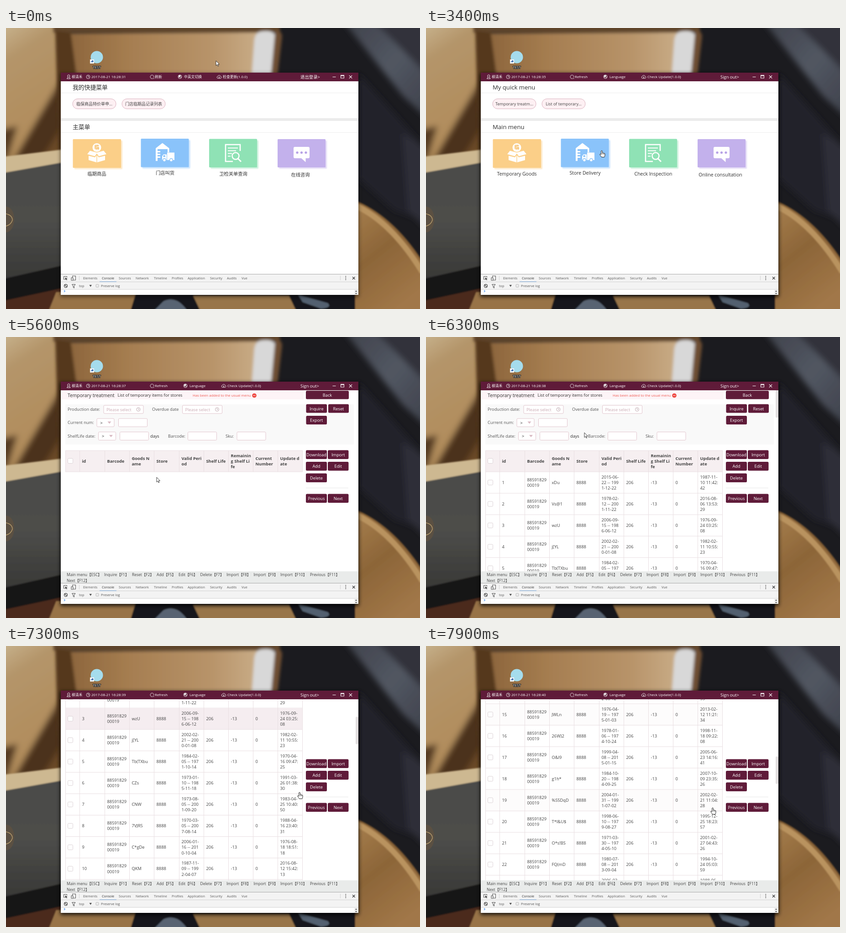
An HTML page for the animation above (8000 ms loop, 907 px wide and 617 px high).

```html
<!DOCTYPE html>
<html lang="zh">
<head>
<meta charset="utf-8">
<style>
html, body { margin: 0; width: 100%; height: 100%; overflow: hidden; background: #1b1a1c; }
svg { position: absolute; left: 0; top: 0; width: 907px; height: 617px; }
#desk { will-change: transform; }
text { font-family: "Open Sans", "Noto Sans CJK SC", "Noto Sans CJK", sans-serif; white-space: pre; }
</style>
</head>
<body>
<svg id="desk" viewBox="0 0 907 617">
  <defs>
    <filter id="soft" x="-20%" y="-20%" width="140%" height="140%"><feGaussianBlur stdDeviation="7"/></filter>
    <filter id="mild" x="-20%" y="-20%" width="140%" height="140%"><feGaussianBlur stdDeviation="3"/></filter>
    <filter id="edge" x="-20%" y="-20%" width="140%" height="140%"><feGaussianBlur stdDeviation="1.4"/></filter>
    <linearGradient id="rail"><stop stop-color="#8d663d"/><stop offset=".3" stop-color="#a57d50"/><stop offset=".75" stop-color="#b8946a"/><stop offset="1" stop-color="#c9ad88"/></linearGradient>
    <linearGradient id="wall" x2=".3" y2="1"><stop stop-color="#cdbb97"/><stop offset=".3" stop-color="#b4956a"/><stop offset="1" stop-color="#b08a58"/></linearGradient>
    <linearGradient id="curtain" x2="1" y2="1"><stop stop-color="#3d4049"/><stop offset=".5" stop-color="#525762"/><stop offset="1" stop-color="#3b3e48"/></linearGradient>
    <linearGradient id="wood" x2=".5" y2="1"><stop stop-color="#a9814f"/><stop offset=".5" stop-color="#8c6538"/><stop offset="1" stop-color="#a17748"/></linearGradient>
    <linearGradient id="lid" x2="0" y2="1"><stop stop-color="#4a4a48"/><stop offset=".5" stop-color="#4d4d4a"/><stop offset="1" stop-color="#383836"/></linearGradient>
  </defs>
  <rect width="907" height="617" fill="#1b1b1f"/>
  <g filter="url(#soft)">
    <path d="M-20-20H125V300H-20Z" fill="url(#wall)"/>
    <path d="M125 105V300H10Z" fill="#4b301a"/>
    <path d="M125 215V300H70Z" fill="#6b4826"/>
    <path d="M-20 225L25 215 0 300H-20Z" fill="#553a21"/>
    <path d="M735-20H930V205L870 150Z" fill="url(#curtain)"/>
    <path d="M800-20L930 110V-20Z" fill="#30323a"/>
    <path d="M772 100L907 250V420L850 400 772 330Z" fill="#22232a"/>
    <path d="M868 230L930 270V450L880 400Z" fill="#2d2f37"/>
  </g>
  <g filter="url(#mild)">
    <path d="M104-10H600V10H104Z" fill="#5f4429"/>
    <path d="M142 12L556 10V130H142Z" fill="url(#rail)"/>
    <path d="M108 6L142 10 158 130 150 270H116Z" fill="#55381d"/>
    <path d="M556 8Q594 2 592 26L581 110H538L544 26Q546 12 556 8Z" fill="#d8d8d8"/>
    <path d="M590 4Q608 6 604 26L594 110H580Z" fill="#6d4d30"/>
  </g>
  <g filter="url(#edge)">
    <path d="M-10 283L130 266V330H-10Z" fill="#cdb891"/>
    <path d="M-10 319L130 294V520L-10 552Z" fill="url(#lid)"/>
    <path d="M-10 552L130 520V630H-10Z" fill="#191412"/>
    <path d="M-10 600L130 570V630H-10Z" fill="#4c291f"/>
    <path d="M760 378Q850 412 920 526V630H760Z" fill="url(#wood)"/>
    <path d="M760 388Q842 422 912 536" fill="none" stroke="#b9935f" stroke-width="12"/>
    <path d="M760 378Q850 412 920 526" fill="none" stroke="#77552f" stroke-width="3"/>
    <path d="M110 580H300L270 630H90Z" fill="#987346"/>
    <path d="M285 580H765V630H270Z" fill="#19191c"/>
    <path d="M345 600Q375 585 400 625H320Z" fill="#596472"/>
    <path d="M410 588H620L640 630H430Z" fill="#987549"/>
    <path d="M640 586L705 604Q715 614 690 616L650 602Z" fill="#536070"/>
  </g>
  <path d="M0 392Q17 394 18 420 17 446 0 449Z" fill="#5b5042"/>
  <path d="M0 408Q14 411 14 422 11 432 0 435" fill="none" stroke="#b49a6b" stroke-width="1.5"/>
</svg>
<svg id="stage" viewBox="0 0 907 617"></svg>
<script>
const WINE = '#5f1b39', INK = '#2e2e2e', LOOP = 8000;
const esc = s => String(s).replace(/&/g, '&amp;').replace(/</g, '&lt;').replace(/>/g, '&gt;');
// y is the optical middle of the line
const text = (x, y, s, size, fill = INK, extra = '') =>
  `<text x="${x}" y="${(y + size * .36).toFixed(2)}" font-size="${size}" fill="${fill}" ${extra}>${esc(s)}</text>`;
const mid = (x, y, s, size, fill, extra = '') => text(x, y, s, size, fill, 'text-anchor="middle" ' + extra);
const rect = (x, y, w, h, fill, extra = '') => `<rect x="${x}" y="${y}" width="${w}" height="${h}" fill="${fill}" ${extra}/>`;
const circle = (x, y, r, fill, extra = '') => `<circle cx="${x}" cy="${y}" r="${r}" fill="${fill}" ${extra}/>`;
const path = (d, fill, extra = '') => `<path d="${d}" fill="${fill}" ${extra}/>`;
const line = (d, stroke, width = 1) => path(d, 'none', `stroke="${stroke}" stroke-width="${width}"`);
const group = (id, body, extra = '') => `<g id="${id}" ${extra}>${body}</g>`;
const button = (x, y, w, h, label) => rect(x, y, w, h, WINE, 'rx="2.5"') + mid(x + w / 2, y + h / 2 + .3, label, 9.25, '#fff');
const card = (x, y, w, h, color) =>
  rect(x + 3, y + 3, w, h, color, 'rx="2" opacity=".45" filter="url(#glow)"') + rect(x, y, w, h, color, 'rx="1.5"');

function desktopIcon() {
  return circle(199, 64, 13.5, '#a5dcec')
    + rect(184, 69, 9, 9, '#f4f6f8') + path('M186 76Q186 72 189 72V70L192 73 189 76V74Q187 74 186 76Z', '#2a5fa8')
    + mid(199, 86.5, 'TEST', 7.6, '#fff', 'stroke="#222" stroke-width="2" stroke-linejoin="round" paint-order="stroke"');
}

function titleIcons(globeX, cloudX) {
  return circle(globeX, 107, 4, 'none', 'stroke="#eee" stroke-width=".9"')
    + path(`M${globeX - 3} 105l3-2 2 2-2 3-2 1zM${globeX + 1} 108l2-1-1 3z`, '#eee')
    + line(`M${cloudX - 3} 110.5a2.3 2.3 0 0 1 0-4.5a3.2 3.2 0 0 1 6 0a2.3 2.3 0 0 1 0 4.5zM${cloudX} 111v-4m-1.5 1.5l1.5-1.5l1.5 1.5`, '#eee', .9);
}

function titleBar() {
  const words = (refresh, lang, langX, update, updateX, out) =>
    titleIcons(langX - 9, updateX - 8) + text(326, 107.5, refresh, 7.9, '#fff') + text(langX, 107.5, lang, 7.8, '#fff')
    + text(updateX, 107.5, update, 7.9, '#fff') + text(645, 107.5, out, 9.4, '#fff');
  return rect(120, 98, 652, 19, WINE)
    + circle(137.3, 105.5, 2.6, 'none', 'stroke="#eee"') + line('M135.5 108L133.5 111.3H141L139 108', '#eee')
    + text(144, 107.5, '柳清禾', 7.8, '#fff')
    + circle(180, 107.3, 4, 'none', 'stroke="#eee" stroke-width=".9"') + line('M180 104.5V107.5H182.5', '#eee', .9)
    + '<text id="clock" x="187" y="110.4" font-size="8" fill="#fff"></text>'
    + line('M321.5 111A4 4 0 1 1 324 107.5L322.5 109M322 110.8H324.5', '#eee', .9)
    + group('barZh', words('刷新', '中英文切换', 390, '检查更新(1.0.0)', 475, '退出登录>'))
    + group('barEn', words('Refresh', 'Language', 402, 'Check Update(1.0.0)', 485, 'Sign out>'))
    + line('M715.5 107.5H722.5M751.8 104.2L758.2 110.6M758.2 104.2L751.8 110.6', '#fff', 1.1)
    + rect(733.5, 104, 7, 6, 'none', 'stroke="#fff"') + rect(733, 103.5, 8, 2, '#fff');
}

function devTools() {
  const tabs = { Elements: 169, Console: 210, Sources: 247, Network: 284, Timeline: 324, Profiles: 363, Application: 398, Security: 447, Audits: 484, Vue: 516 };
  return rect(120, 540, 652, 46, '#f3f3f3') + rect(120, 574, 652, 12, '#fff')
    + line('M120 540.5H772', '#a9a9a9') + line('M120 557.5H772M120 574H772M160.5 544V554M732.5 544V554', '#d3d3d3')
    + line('M129 552H126.5V545.5H133.5V548', '#555') + path('M129.5 547.5L135 551 132.5 551.5 134 554 133 554 131.5 552 130 553.5Z', '#444')
    + rect(145.5, 544.5, 7, 9, 'none', 'stroke="#555"') + rect(143, 548.5, 4, 5.5, '#f3f3f3', 'stroke="#555"')
    + Object.entries(tabs).map(([name, x]) => text(x, 549.3, name, 7.25, name === 'Console' ? '#333' : '#5a5a5a')).join('')
    + line('M205 557H242', '#74a3d8', 1.2)
    + [545.5, 549, 552.5].map(y => circle(744.3, y, .9, '#444')).join('')
    + line('M759 546.3L764.6 552M764.6 546.3L759 552', '#333', 1.2)
    + circle(131, 566.3, 3.5, 'none', 'stroke="#444" stroke-width="1.2"') + line('M128.5 564L133.5 568.8', '#444', 1.2)
    + path('M144.5 563H152L149.3 566.5V571L147.2 569.5V566.5Z', 'none', 'stroke="#444"')
    + text(160, 566.5, 'top', 7.25, '#555') + path('M182.5 564H188L185.25 568.5Z', '#555')
    + rect(197, 563, 6, 6, '#eee', 'rx="1" stroke="#aaa" stroke-width=".8"') + text(208, 566.5, 'Preserve log', 7.25, '#555')
    + line('M127 575.8L129.3 577.8 127 579.8', '#3f8be8', 1.1)
    + rect(763, 575, 8, 11, '#eee') + path('M765 579H769L767 576.5ZM765 582H769L767 584.5Z', '#444');
}

function homePage() {
  const words = (title, pills, menu, labels, size) => text(146, 130.3, title, size) + text(146, 217.3, menu, size)
    + pills.map((s, i) => mid(193.5 + i * 108, 167, s, 9, '#444')).join('')
    + labels.map((s, i) => mid([199, 348.5, 498, 645][i], [320, 318, 320, 322][i], s, size * .8)).join('');
  const pill = x => rect(x, 155.5, 95, 22, '#fdf0f3', 'rx="11" stroke="#dcb3c0"');
  return line('M120 142.5H772M120 229.5H772', '#eee') + rect(120, 198, 652, 6, '#ebebeb') + pill(146) + pill(254)
    + card(146.5, 244, 105.5, 63, '#fbcf88') + card(295.5, 243, 105, 62.5, '#8ac3fa')
    + card(445, 243.5, 105, 62.5, '#8fe2b5') + card(595, 244, 105, 62, '#c3b1ec')
    + circle(199, 262.5, 9.5, '#fff') + mid(199, 262.5, '临', 11, '#f5b95c', 'font-weight="700"')
    + path('M178 277L184 269.5 199 273.5 214 269.5 220 277 203.5 281.5 199 275.5 194.5 281.5ZM181 280.5L195 284 198.3 279.5V295L181 290ZM217 280.5L203 284 199.7 279.5V295L217 290Z', '#fff')
    + path('M328 264L342.7 252.5 357.5 264V273H354V266H332V270H338V273H332V276H338V279H332V282H338V285H332V292H328Z', '#fff')
    + path('M353 273.5H369V290H353ZM342 281.5L345 277.5H352V290H342Z', '#fff') + rect(344.5, 279.5, 4.5, 3.5, '#8ac3fa')
    + [347, 362].map(x => circle(x, 290, 3.4, '#fff', 'stroke="#8ac3fa" stroke-width="1.5"')).join('')
    + line('M513 270V256H481V293H497', '#fff', 2.6) + line('M486 263.5H508M486 269.5H504M486 275.5H495M486 281.5H492', '#fff', 2)
    + circle(503, 281, 7.5, 'none', 'stroke="#fff" stroke-width="2.5"') + line('M508 286.5L515 293.5', '#fff', 3)
    + path('M633 261H662Q665 261 665 264V283Q665 286 662 286H656.5V294.5L647 286H633Q630 286 630 283V264Q630 261 633 261Z', '#fff')
    + [638, 647.5, 657].map(x => circle(x, 273.5, 2.6, '#b7a2e6')).join('')
    + group('homeZh', words('我的快捷菜单', ['临保商品特价单申...', '门店临期品记录列表'], '主菜单', ['临期商品', '门店叫货', '卫检关单查询', '在线咨询'], 12.8))
    + group('homeEn', words('My quick menu', ['Temporary treatm...', 'List of temporary...'], 'Main menu',
      ['Temporary Goods', 'Store Delivery', 'Check Inspection', 'Online consultation'], 13.1));
}

function choicePage() {
  const choice = (x, iconX, color, mark, label, labelX, arrowX) => card(x, 259.5, 158, 87, color)
    + `<g transform="translate(${iconX} 0)">`
    + line('M55 291V282Q55 276 49 275.5H8Q0 276 0 283V323Q0 330 8 330.5H24M14 274.5H40', '#fff', 2.7)
    + line('M7 290H40M7 302H27M7 314H24', '#fff', 2.6)
    + circle(46, 315, 16, color, 'stroke="#fff" stroke-width="2.7"') + mid(46, 315, mark, 17, '#fff', 'font-weight="700"') + '</g>'
    + text(labelX, 365.5, label, 12.5, '#222')
    + circle(arrowX, 366, 5.7, '#fff', 'stroke="#9fb5ae"') + path(`M${arrowX - 2.5} 363L${arrowX + 4} 366 ${arrowX - 2.5} 369 ${arrowX - 1} 366Z`, '#6d9688');
  return button(670, 126, 92.5, 24, 'Go to mainmenu')
    + choice(250, 300, '#b7e7fd', '临', 'List of temporary items', 257, 400.8)
    + choice(479, 527, '#f5e28b', '特', 'Special application list', 488, 627);
}

const COLS = [130, 161, 216, 270, 324, 379, 433, 487, 541, 595, 649];
const ROW = 47.06, TOP = 296;
const HEADS = ['id', 'Barcode', 'Goods N|ame', 'Store', 'Valid Peri|od', 'Shelf Life', 'Remainin|g Shelf Li|fe', 'Current|Number', 'Update d|ate'];
const GOODS = `xDu~2015-06-22 -- 1991-12-22~1987-11-10 11:42:42
Vs@1~1978-02-12 -- 2001-11-22~2016-08-06 13:53:29
wzU~2006-09-15 -- 1986-06-12~1976-09-24 03:25:08
j[YL~2002-02-21 -- 2000-01-08~1982-02-11 10:55:23
Tb(TXbu~1984-02-05 -- 1971-10-14~1970-04-16 09:47:25
CZs~1973-01-10 -- 1985-11-18~1991-03-26 01:38:30
CNW~1973-08-05 -- 2001-09-20~1983-04-25 10:40:50
7VJR5~1970-03-05 -- 2007-08-14~1988-04-16 23:40:31
C*gDe~2006-01-16 -- 2010-10-04~1976-08-18 18:51:18
QKM~1987-11-09 -- 1992-04-07~2016-08-12 15:42:13
p3Kd~1992-05-14 -- 1979-02-19~2004-07-03 08:16:44
Rw!x~1981-10-27 -- 2012-06-30~1997-01-15 21:05:37
hT6~2009-03-02 -- 1988-12-11~1979-05-28 14:32:09
Yq)Z~1995-07-23 -- 1982-06-12~2011-09-06 05:27:55
JWLn~1976-04-19 -- 1975-01-03~2013-02-12 11:21:34
26W)2~1978-01-06 -- 1974-10-24~1998-11-18 09:22:08
O&I9~1999-04-08 -- 2015-01-15~2005-06-23 14:16:41
g1h*~1984-10-20 -- 1984-09-25~2007-10-09 23:35:26
%S5DqD~2004-01-31 -- 1991-07-02~2002-02-21 11:04:28
T*I&U$~1998-06-10 -- 1979-08-27~1995-12-25 18:23:57
O*s!BS~1971-03-30 -- 1974-05-10~2001-02-27 04:43:26
FQ(mD~1980-07-08 -- 2013-09-04~1994-10-24 05:03:59
mL4~2006-03-17 -- 1990-08-21~1988-06-14 16:50:12`.split('\n').map(row => row.split('~'));

const cell = (col, y, lines, fill = '#444', extra = '') =>
  lines.map((s, i) => text(COLS[col] + 5.5, y + (i - (lines.length - 1) / 2) * 12.2, s, 9.3, fill, extra)).join('');
const checkbox = y => rect(135.5, y - 5.5, 11, 11, '#fff', 'rx="2" stroke="#dcd3d6"');
const wrapDate = s => [s.slice(0, 8), s.slice(8, 17), s.slice(17)];

function goodsRow([name, valid, update], i) {
  const y = TOP + ROW * (i + .5);
  const cells = [[i + 1], ['88591829', '00019'], [name], ['8888'], wrapDate(valid), ['206'], ['-13'], ['0'], wrapDate(update)];
  return rect(130, TOP + ROW * i, 519.5, ROW, '#f5edf0', `id="row${i + 1}" opacity="0"`) + checkbox(y)
    + cells.map((lines, c) => cell(c + 1, y, lines)).join('')
    + line(`M130 ${TOP + ROW * (i + 1)}H649.5`, '#e9dfe2');
}

function filterForm() {
  const box = (x, y, w) => rect(x + .5, y + .5, w, 18, '#fff', 'rx="2" stroke="#e2c6ce"');
  const date = x => box(x, 149.5, 87) + text(x + 6.5, 159.3, 'Please select', 9.2, '#c9a9b2')
    + circle(x + 76.5, 159, 4, 'none', 'stroke="#b9a2a9" stroke-width=".9"') + line(`M${x + 76.5} 156.5V159.3H${x + 78.5}`, '#b9a2a9', .9);
  const select = (x, y) => box(x, y, 38) + text(x + 8, y + 10, '>', 9) + path(`M${x + 24} ${y + 7}h8l-4 5z`, '#d9bac3');
  return rect(120, 117, 532, 20, '#fdf4f7') + text(135, 128, 'Temporary treatment', 10.3)
    + text(244.5, 128, 'List of temporary items for stores', 9.15)
    + text(409, 128.5, 'Has been added to the usual menu', 7.8, '#ee5a52') + circle(544, 128.5, 4.8, '#ee4b45') + line('M541.5 128.5H546.5', '#fff', 1.2)
    + rect(130, 148, 632, 88, '#f9f9f9')
    + text(135, 159, 'Production date:', 9.2, '#555') + date(213.5) + text(320, 159, 'Overdue date', 9.2, '#555') + date(386)
    + text(135, 188, 'Current num:', 9.2, '#555') + select(198.5, 178.5) + box(246, 178.5, 63)
    + text(135, 217.5, 'ShelfLife date:', 9.2, '#555') + select(202, 208) + box(249, 208, 63) + text(316, 218, 'days', 9.2)
    + text(355, 217.5, 'Barcode:', 9.2, '#555') + box(398, 208, 63) + text(481, 217.5, 'Sku:', 9.2, '#555') + box(505.5, 208, 63)
    + button(657, 118, 94, 18.5, 'Back') + button(657.5, 147.5, 45.5, 19, 'Inquire')
    + button(706, 147.5, 45, 19, 'Reset') + button(657.5, 173, 45.5, 19, 'Export');
}

function tablePage() {
  const keys = [['Main menu【ESC】', 133], ['Inquire【F1】', 215], ['Reset【F2】', 276], ['Add【F5】', 330], ['Edit【F6】', 378],
    ['Delete【F7】', 425.5], ['Import【F8】', 483], ['Import【F9】', 542.5], ['Import【F10】', 601], ['Previous【F11】', 666]];
  const columns = (top, bottom) => line(COLS.map(x => `M${x + .5} ${top}V${bottom}`).join(''), '#e9dfe2');
  const content = filterForm() + rect(130, 249, 519.5, 47, '#f6eff1') + line('M130 249.5H649.5M130 296H649.5', '#e9dfe2')
    + checkbox(272) + HEADS.map((s, i) => cell(i + 1, 272.5, s.split('|'), '#444', 'font-weight="700"')).join('') + columns(249, TOP)
    + group('rows', GOODS.map(goodsRow).join('') + columns(TOP, TOP + ROW * GOODS.length));
  return `<g clip-path="url(#view)">${group('scroller', content)}</g>`
    + button(657, 248.5, 46, 19.5, 'Download') + button(705, 248.5, 45.5, 19.5, 'Import')
    + button(657, 274, 46, 19.5, 'Add') + button(705, 274, 45.5, 19.5, 'Edit') + button(657, 299.5, 46, 19.5, 'Delete')
    + line('M657 331.5H750', '#e8e8e8') + button(657, 344.5, 46, 19.5, 'Previous') + button(705, 344.5, 45.5, 19.5, 'Next')
    + rect(766, 117, 6, 60, '#e2dfe0', 'id="thumb" rx="2"')
    + rect(120, 514.5, 652, 25.5, '#e9ebea')
    + keys.map(([s, x]) => text(x, 522, s, 8.5, '#444')).join('') + text(133, 534.5, 'Next【F12】', 8.5, '#444');
}

const pointers = group('arrow', path('M0 0V10.5L2.5 8.3 4.2 12 5.8 11.3 4.2 7.7H7.5Z', '#fff', 'stroke="#111" stroke-width=".8"'))
  + group('hand', path('M-1.3 1Q0-1 1.3 1V5Q3 4.3 3.5 5.5 5 5 5.5 6.3 7 6 7 7.5V10Q7 12 5.8 14.5H-.5Q-2 11.5-4.3 9Q-4 7-2.7 7.8L-1.3 9Z', '#fff', 'stroke="#111" stroke-width=".9"')
  + line('M1.3 5V8.5M3.5 6V8.5M5.4 6.5V8.5', '#111', .7));

document.getElementById('stage').innerHTML = `<defs>
  <clipPath id="view"><rect x="120" y="117" width="652" height="397.5"/></clipPath>
  <filter id="glow"><feGaussianBlur stdDeviation="1.2"/></filter>
  <filter id="blur" x="-10%" y="-10%" width="120%" height="120%"><feGaussianBlur stdDeviation="4"/></filter></defs>`
  + desktopIcon() + rect(119, 100, 654, 490, '#000', 'id="shade" filter="url(#blur)"')
  + rect(120, 98, 652, 488, '#fff') + titleBar()
  + group('home', homePage()) + group('choice', choicePage()) + group('table', tablePage())
  + devTools() + group('cursor', pointers);

const el = {};
document.querySelectorAll('#stage [id]').forEach(node => el[node.id] = node);

// time, x, y, hand pointer
const MOVES = [[200, 460, 72, 0], [500, 400, 130, 0], [700, 222, 216, 0], [900, 400, 200, 0], [1000, 522, 156, 0], [1100, 498, 104, 1],
  [1400, 401, 104, 1], [2600, 401, 104, 0], [2900, 300, 155, 1], [3000, 238, 165, 0], [3200, 350, 235, 1], [3400, 385, 269, 1],
  [3500, 288, 280, 1], [3800, 205, 280, 1], [4200, 205, 280, 0], [4600, 540, 273, 1], [5000, 330, 308, 1], [5300, 330, 308, 0],
  [5700, 330, 308, 0], [6300, 347, 210, 0], [6700, 643, 321, 1], [7300, 643, 321, 1], [7900, 628, 355, 1]];
const SCROLL = [[6900, 0], [7300, 254], [7500, 446], [7900, 828]];
const TICKS = [1200, 2000, 2300, 2900, 4000, 5000, 5900, 6900, 7500];
const HOVERS = [[1, 6500, 7000], [3, 7000, 7400], [9, 7400, 7650], [15, 7600, 7700], [19, 7850, 8200]];

function track(keys, t) {
  const next = keys.findIndex(key => key[0] > t);
  if (next === 0) return keys[0].slice(1);
  if (next < 0) return keys[keys.length - 1].slice(1);
  const a = keys[next - 1], b = keys[next], p = (t - a[0]) / (b[0] - a[0]);
  return a.slice(1).map((v, i) => v + (b[i + 1] - v) * p);
}
const clamp = v => Math.max(0, Math.min(1, v));
const show = (node, on) => node.setAttribute('display', on ? 'inline' : 'none');

function draw(ms) {
  const t = Math.floor(ms % LOOP / 100) * 100;
  const english = t >= 2200, loaded = t >= 5800;
  show(el.barZh, !english); show(el.homeZh, !english);
  show(el.barEn, english); show(el.homeEn, english);
  show(el.home, t < 4000);
  show(el.choice, t >= 4000 && t < 5300);
  show(el.table, t >= 5300);
  show(el.rows, loaded); show(el.thumb, loaded);
  el.shade.setAttribute('opacity', t < 2000 ? .5 : .85);
  el.clock.textContent = '2017-08-21 16:28:' + (31 + TICKS.filter(tick => tick <= t).length);

  const [scroll] = track(SCROLL, t);
  el.scroller.setAttribute('transform', `translate(0 ${-scroll})`);
  el.thumb.setAttribute('y', 117 + scroll * .152);
  for (const [row, from, to] of HOVERS)
    el['row' + row].setAttribute('opacity', Math.min(clamp((t - from) / 250), clamp(1 - (t - to) / 250)));

  const [x, y, hand] = track(MOVES, t);
  const pointing = hand > .5 || (t >= 1100 && t < 2700);
  el.cursor.setAttribute('transform', `translate(${x} ${y})`);
  show(el.hand, pointing); show(el.arrow, !pointing);
}

const start = performance.now();
function frame() {
  draw(performance.now() - start);
  requestAnimationFrame(frame);
}
frame();
</script>
</body>
</html>
```
